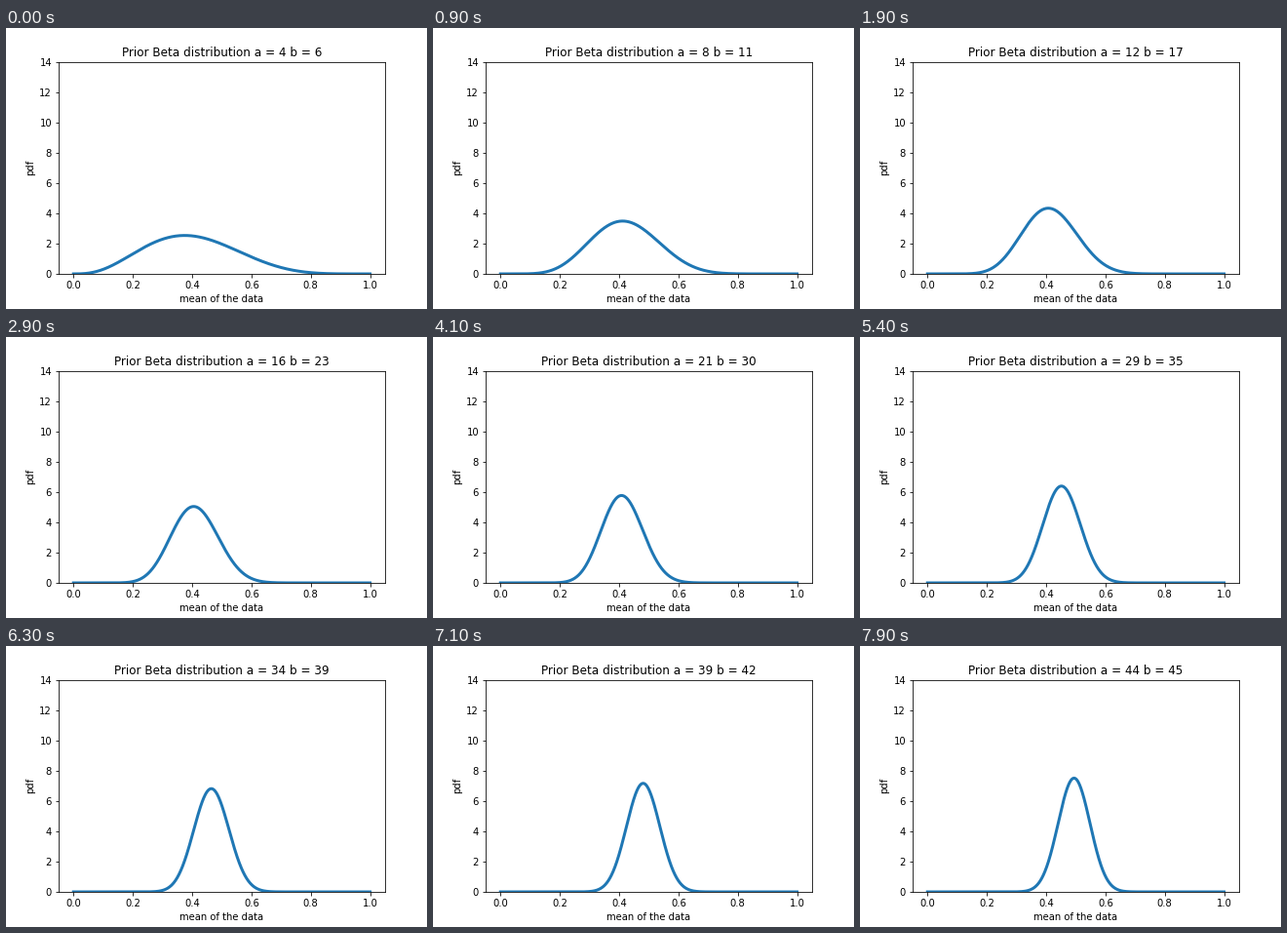
A matplotlib script that plays this animation: 432 by 288 pixels, repeating every 8000 ms.

```python
from math import lgamma

import matplotlib.pyplot as plt
import numpy as np
from matplotlib.animation import FuncAnimation

FRAMES = 80
INTERVAL = 100
PRIOR_TOTAL = 10

# Number of successes known at a few points of the run, spread evenly between.
STEPS = [0, 9, 29, 41, 54, 63, 79]
HEADS = [4, 8, 16, 21, 29, 34, 44]

plt.rcParams["font.family"] = "DejaVu Sans"
x = np.linspace(0, 1, 1001)


def beta_pdf(a, b):
    norm = np.exp(lgamma(a + b) - lgamma(a) - lgamma(b))
    return norm * x ** (a - 1) * (1 - x) ** (b - 1)


def params(step):
    a = int(np.interp(step, STEPS, HEADS) + 0.5)
    return a, PRIOR_TOTAL + step - a


fig, ax = plt.subplots(figsize=(6, 4), dpi=72, facecolor="white")
fig.subplots_adjust(left=0.125, right=0.9, bottom=0.125, top=0.88)
line, = ax.plot(x, beta_pdf(*params(0)), color="#1f77b4", lw=3)
ax.set(xlim=(-0.05, 1.05), ylim=(0, 14), xlabel="mean of the data", ylabel="pdf")
title = ax.set_title("")


def update(step):
    a, b = params(step)
    line.set_ydata(beta_pdf(a, b))
    title.set_text(f"Prior Beta distribution a = {a} b = {b}")
    return line, title


anim = FuncAnimation(fig, update, frames=FRAMES, interval=INTERVAL,
                     repeat=True, repeat_delay=0, blit=False)
plt.show()
```
